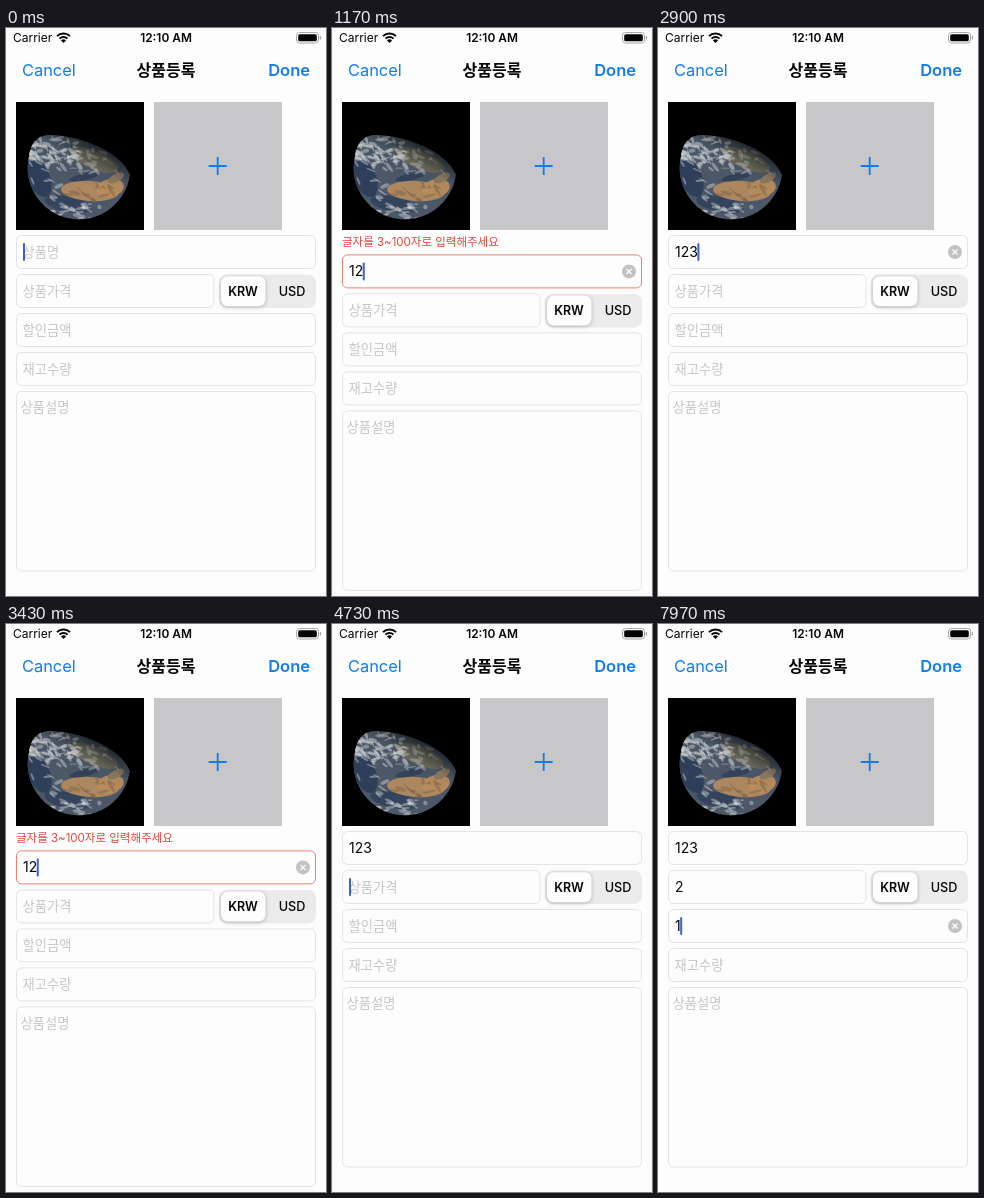
These frames come from a looping animation (320x568 px, 8000 ms). An HTML page with a canvas:

```html
<!DOCTYPE html>
<html lang="ko">
<head>
<meta charset="utf-8">
<title>상품등록</title>
<style>
html, body { margin: 0; width: 100%; height: 100%; overflow: hidden; background: #fdfdfd; }
canvas { display: block; width: 320px; height: 568px; }
</style>
</head>
<body>
<canvas id="stage"></canvas>
<script>
const LOOP = 8000, W = 320, H = 568;
const FONT = 'Inter, "Noto Sans CJK KR", "Noto Sans CJK", "Noto Sans CJK JP", sans-serif';
const C = {
  page: '#fdfdfd', ink: '#050505', blue: '#117cee', line: '#e3e3ea',
  hint: '#c6c6ca', grey: '#c7c7c9', seg: '#ebebec', error: '#e5453c',
  errorLine: '#ee7f70', caret: '#3a5fd0', clear: '#c2c2c4', battery: '#a8a8aa'
};

// Each step: time, focused row, and the values of the first three rows
const steps = [
  { at: -720, focus: 0, values: ['', '', ''] },
  { at: 820, focus: 0, values: ['1', '', ''] },
  { at: 1150, focus: 0, values: ['12', '', ''] },
  { at: 2600, focus: 0, values: ['123', '', ''] },
  { at: 3160, focus: 0, values: ['12', '', ''] },
  { at: 3750, focus: 0, values: ['123', '', ''] },
  { at: 4350, focus: 1, values: ['123', '', ''] },
  { at: 6050, focus: 1, values: ['123', '2', ''] },
  { at: 6790, focus: 2, values: ['123', '2', ''] },
  { at: 7750, focus: 2, values: ['123', '2', '1'] }
];
const rows = [
  { y: 207, w: 300, hint: '상품명' },
  { y: 246, w: 198.5, hint: '상품가격' },
  { y: 285, w: 300, hint: '할인금액' },
  { y: 324, w: 300, hint: '재고수량' }
];

const canvas = document.getElementById('stage');
const g = canvas.getContext('2d');
const dpr = window.devicePixelRatio || 1;
canvas.width = W * dpr;
canvas.height = H * dpr;

const clamp = v => Math.max(0, Math.min(1, v));
const ease = v => v * v * (3 - 2 * v);

function text(s, x, y, size, color, weight = 400, align = 'left') {
  g.font = `${weight} ${size}px ${FONT}`;
  g.textAlign = align;
  g.fillStyle = color;
  g.fillText(s, x, y);
}

function box(x, y, w, h, r) {
  g.beginPath();
  g.roundRect(x, y, w, h, r);
}

function outline(x, y, w, h, color) {
  box(x + 0.5, y + 0.5, w - 1, h - 1, 5);
  g.strokeStyle = color;
  g.lineWidth = 1;
  g.stroke();
}

function blob(color, x, y, rx, ry, turn = 0) {
  g.fillStyle = color;
  g.beginPath();
  g.ellipse(x, y, rx, ry, turn, 0, Math.PI * 2);
  g.fill();
}

function cross(x, y, r, color, width) {
  g.strokeStyle = color;
  g.lineWidth = width;
  g.beginPath();
  g.moveTo(x - r, y);
  g.lineTo(x + r, y);
  g.moveTo(x, y - r);
  g.lineTo(x, y + r);
  g.stroke();
}

function statusBar() {
  text('Carrier', 7, 14.4, 12, C.ink);
  text('12:10 AM', 160, 14.4, 11.9, C.ink, 600, 'center');
  g.strokeStyle = C.ink;
  g.lineWidth = 2;
  for (const r of [5.6, 9.2]) {
    g.beginPath();
    g.arc(57.5, 14.6, r, -Math.PI * 0.75, -Math.PI * 0.25);
    g.stroke();
  }
  g.fillStyle = C.ink;
  g.beginPath();
  g.moveTo(57.5, 15);
  g.arc(57.5, 15, 3.6, -Math.PI * 0.75, -Math.PI * 0.25);
  g.fill();

  box(290.5, 4.5, 22, 10.5, 3);
  g.strokeStyle = C.battery;
  g.lineWidth = 1;
  g.stroke();
  box(292.2, 6.2, 18.6, 7.1, 1.6);
  g.fill();
  g.fillStyle = C.battery;
  box(313.7, 8, 1.4, 3.6, 0.7);
  g.fill();
}

function seeded(seed) {
  return () => (seed = seed * 16807 % 2147483647) / 2147483647;
}

// Scatters soft streaks inside an ellipse
function streaks(rnd, count, color, x, y, rx, ry) {
  for (let i = 0; i < count; i++) {
    const a = rnd() * Math.PI * 2, d = Math.sqrt(rnd());
    blob(color, x + Math.cos(a) * d * rx, y + Math.sin(a) * d * ry,
      2 + rnd() * 5, 0.6 + rnd() * 1.6, rnd() * 1.8 - 0.5);
  }
}

function globe() {
  const rnd = seeded(77);
  g.fillStyle = '#000';
  g.fillRect(10, 74, 128, 128);
  g.save();
  g.beginPath();
  g.arc(73, 140, 51.3, 0.14, Math.PI + 0.22);
  g.bezierCurveTo(25, 113, 33, 107, 44, 107);
  g.bezierCurveTo(70, 107, 114, 122, 124, 147);
  g.clip();
  g.fillStyle = '#4c5868';
  g.fillRect(10, 74, 128, 128);
  blob('#2f3f5a', 33, 150, 11, 20, -0.4);
  blob('#34445c', 62, 176, 24, 8, 0.2);
  blob('#6b6a5c', 88, 132, 26, 9, 0.4);
  blob('#ad875f', 84, 163, 29, 10, 0.06);
  blob('#b98d5f', 104, 160, 14, 9, -0.2);
  blob('#8d7a62', 110, 150, 9, 4, -0.5);
  blob('#34435a', 78, 149, 15, 3.5, -0.2);
  streaks(rnd, 45, 'rgba(222,224,224,.5)', 48, 122, 28, 15);
  streaks(rnd, 26, 'rgba(222,224,224,.42)', 40, 150, 20, 30);
  streaks(rnd, 20, 'rgba(205,208,210,.4)', 92, 135, 28, 13);
  streaks(rnd, 26, 'rgba(215,218,220,.42)', 74, 183, 36, 8);
  streaks(rnd, 14, 'rgba(120,95,68,.45)', 86, 163, 26, 9);
  const shade = g.createLinearGradient(66, 154, 92, 106);
  shade.addColorStop(0, 'rgba(0,0,0,0)');
  shade.addColorStop(0.45, 'rgba(0,0,0,.05)');
  shade.addColorStop(1, 'rgba(0,0,0,.85)');
  g.fillStyle = shade;
  g.fillRect(10, 74, 128, 128);
  g.restore();
}

function header() {
  statusBar();
  text('Cancel', 16, 48.2, 16.4, C.blue);
  text('상품등록', 160, 47.8, 16, C.ink, 700, 'center');
  text('Done', 304, 48.2, 16.5, C.blue, 600, 'right');
  globe();
  g.fillStyle = C.grey;
  g.fillRect(148, 74, 128, 128);
  cross(211.7, 138, 9, C.blue, 1.8);
}

function segment(y) {
  box(213, y + 0.5, 97, 33.5, 8);
  g.fillStyle = C.seg;
  g.fill();
  g.save();
  g.shadowColor = 'rgba(0,0,0,.25)';
  g.shadowBlur = 4 * dpr;
  g.shadowOffsetY = dpr;
  box(215, y + 2.2, 44.5, 30, 7);
  g.fillStyle = C.page;
  g.fill();
  g.restore();
  text('KRW', 237, y + 21.7, 12.5, C.ink, 600, 'center');
  text('USD', 286, y + 21.7, 12.7, C.ink, 500, 'center');
}

function clearButton(x, y) {
  blob(C.clear, x, y, 7, 7);
  g.save();
  g.translate(x, y);
  g.rotate(Math.PI / 4);
  cross(0, 0, 3.6, C.page, 1.3);
  g.restore();
}

function caretAlpha(idle) {
  if (idle < 750) return 1;
  const u = (idle - 750) % 830;
  return u < 430 ? 1 - clamp(u / 200) : clamp((u - 430) / 130);
}

function errorLevel(t) {
  const ramp = from => ease(clamp((t - from) / 200));
  return ramp(820) - ramp(2600) + ramp(3160) - ramp(3750);
}

function field(row, i, y, now, t, bad) {
  const value = now.values[i] || '';
  const focused = now.focus === i;
  outline(10, y, row.w, 34, bad ? C.errorLine : C.line);
  if (value) text(value, 17, y + 22, 14, C.ink);
  else text(row.hint, 16.5, y + 21.8, 13.3, C.hint);
  if (!focused) return;
  if (value) clearButton(row.w - 3, y + 17);
  g.font = `400 14px ${FONT}`;
  const x = 17 + (value ? g.measureText(value).width - 0.5 : 0);
  g.globalAlpha = caretAlpha(t - now.at);
  g.fillStyle = C.caret;
  box(x, y + 8, 2, 18, 1);
  g.fill();
  g.globalAlpha = 1;
}

function draw(t) {
  const now = steps.filter(s => s.at <= t).pop();
  const level = errorLevel(t);
  const shift = 19.4 * level;
  const length = now.values[0].length;
  g.setTransform(dpr, 0, 0, dpr, 0, 0);
  g.fillStyle = C.page;
  g.fillRect(0, 0, W, H);
  header();
  if (level > 0) {
    g.globalAlpha = level;
    text('글자를 3~100자로 입력해주세요', 10, 218.4, 11.5, C.error);
    g.globalAlpha = 1;
  }
  rows.forEach((row, i) => {
    field(row, i, row.y + shift, now, t, i === 0 && length > 0 && length < 3);
  });
  segment(246 + shift);
  outline(10, 363 + shift, 300, 180.5, C.line);
  text('상품설명', 14.5, 384.3 + shift, 13.3, C.hint);
}

const start = performance.now();
function frame() {
  draw((performance.now() - start) % LOOP);
  requestAnimationFrame(frame);
}
frame();
</script>
</body>
</html>
```
